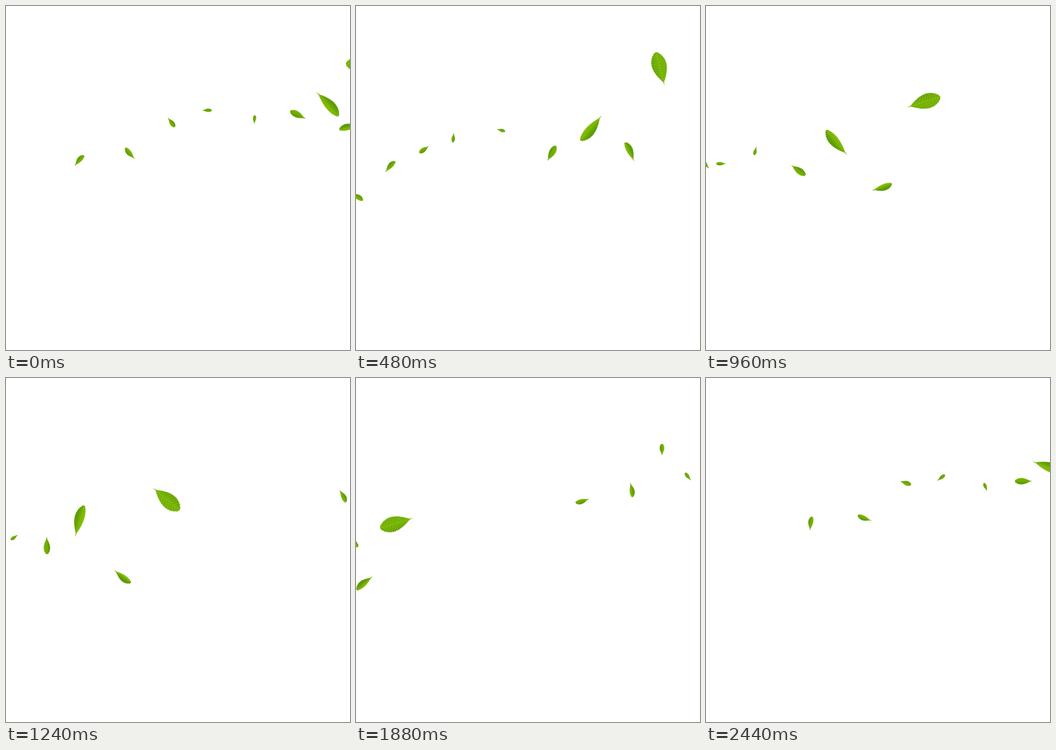
An HTML page with a canvas that plays this animation: 600 px wide and 600 px high, repeating every 2.48 s.

```html
<!DOCTYPE html>
<html lang="en">
<head>
<meta charset="utf-8">
<title>Leaves in the wind</title>
<style>
html, body { margin: 0; width: 100%; height: 100%; overflow: hidden; background: #fff; }
canvas { display: block; width: 600px; height: 600px; }
</style>
</head>
<body>
<canvas id="stage" width="600" height="600"></canvas>
<script>
const ctx = document.getElementById('stage').getContext('2d');
const STEP = 40, LOOP = 2480, CYCLE = 2600;
const leaves = [];

// cw / ccw: half widths on either side of the midrib; mid: time at x = 300
// keys: [time, y, stem direction in degrees]
function leaf(look, mid, speed, ...keys) {
  leaves.push({ ...look, mid, speed, keys, path: outline(look) });
}

function outline({ len, cw, ccw, teeth }) {
  const p = new Path2D(), body = len * 0.9, x0 = -len / 2;
  const depth = Math.min(1.1, len * 0.03);
  const edge = u => Math.pow(Math.sin(Math.PI * Math.pow(u, 0.8)), 0.85);
  p.moveTo(x0, 0);
  for (let i = 1; i <= teeth; i++) {
    const u = i / (teeth + 1), w = cw * edge(u);
    p.lineTo(x0 + u * body - 1, w + depth / 2);
    p.lineTo(x0 + u * body, Math.max(0.4, w - depth / 2));
  }
  p.lineTo(x0 + body, 0.6);
  p.lineTo(len / 2, 0);
  p.lineTo(x0 + body, -0.6);
  for (let i = teeth; i >= 1; i--) {
    const u = i / (teeth + 1), w = ccw * edge(u);
    p.lineTo(x0 + u * body, -Math.max(0.4, w - depth / 2));
    p.lineTo(x0 + u * body - 1, -w - depth / 2);
  }
  p.closePath();
  return p;
}

// Smooth curve through the keys, straight beyond both ends
function sample(keys, t, k) {
  const last = keys.length - 1;
  const rise = (a, b) => (keys[b][k] - keys[a][k]) / (keys[b][0] - keys[a][0]);
  if (t <= keys[0][0]) return keys[0][k] + rise(0, 1) * (t - keys[0][0]);
  if (t >= keys[last][0]) return keys[last][k] + rise(last - 1, last) * (t - keys[last][0]);
  let i = 0;
  while (t > keys[i + 1][0]) i++;
  const slope = j => rise(Math.max(0, j - 1), Math.min(last, j + 1));
  const h = keys[i + 1][0] - keys[i][0], s = (t - keys[i][0]) / h;
  const s2 = s * s, s3 = s2 * s;
  return (2 * s3 - 3 * s2 + 1) * keys[i][k] + (s3 - 2 * s2 + s) * h * slope(i)
    + (3 * s2 - 2 * s3) * keys[i + 1][k] + (s3 - s2) * h * slope(i + 1);
}

function line(x1, y1, x2, y2) {
  ctx.beginPath();
  ctx.moveTo(x1, y1);
  ctx.lineTo(x2, y2);
  ctx.stroke();
}

function drawLeaf(f, time) {
  const half = CYCLE / 2;
  const u = ((time - f.mid + half) % CYCLE + CYCLE) % CYCLE - half;
  const t = u + f.mid;
  ctx.save();
  ctx.translate(300 - 340 * Math.sin(f.speed * u), sample(f.keys, t, 1));
  ctx.rotate(sample(f.keys, t, 2) * Math.PI / 180);

  const g = ctx.createLinearGradient(0, -f.ccw, 0, f.cw);
  f.tones.forEach((c, i) => g.addColorStop(i / (f.tones.length - 1), c));
  ctx.fillStyle = g;
  ctx.fill(f.path);

  ctx.clip(f.path);
  ctx.lineWidth = f.len > 40 ? 0.9 : 0.6;
  if (f.veins) {
    ctx.strokeStyle = f.veins;
    for (let x = -f.len * 0.5; x < f.len * 0.35; x += f.len * 0.08) {
      line(x + 5, 0, x - 2, f.cw);
      line(x + 5, 0, x - 2, -f.ccw);
    }
  }
  ctx.strokeStyle = f.rib;
  line(-f.len * 0.45, 0, f.len * 0.4, 0);
  ctx.restore();
}

const green = { rib: 'rgba(150,200,30,.6)', tones: ['#8fc206', '#6dab02', '#579404'] };
const small = { ...green, tones: ['#7fb800', '#6aa600', '#5c9602'] };
const tiny = { ...small, rib: 'rgba(150,200,30,.4)' };

leaf({ ...tiny, len: 15, cw: 2.8, ccw: 2.8, teeth: 6 }, 357, 0.00113,
  [-160, 190, 69], [0, 198, 94], [320, 210, 153], [640, 226, 234], [1240, 278, 325]);
leaf({ ...tiny, len: 17, cw: 3, ccw: 3, teeth: 6 }, 132, 0.00113,
  [-720, 172, 53], [-160, 174, 142], [0, 182, 180], [320, 210, 240], [640, 249, 310], [960, 275, 360]);
leaf({ ...small, len: 20.5, cw: 4, ccw: 4, teeth: 7 }, -31, 0.0011,
  [-1040, 117, 35], [-720, 125, 90], [-160, 183, 198], [0, 203, 233], [320, 240, 296], [640, 258, 352]);
leaf({ ...small, len: 26, cw: 5.5, ccw: 3.2, teeth: 8 }, -221, 0.00112,
  [-1040, 168, 214], [-720, 195, 263], [-160, 244, 383], [0, 257, 411], [320, 275, 470], [640, 285, 514]);
leaf({ ...small, len: 25, cw: 5.5, ccw: 3.2, teeth: 8 }, -470, 0.00113,
  [-1360, 206, 244], [-1040, 207, 288], [-720, 214, 345], [-160, 254, 460], [0, 270, 493], [320, 312, 545]);
leaf({ ...small, len: 31, cw: 5.6, ccw: 5.6, teeth: 9 }, 587, 0.00113,
  [-160, 180, 0], [0, 190, 27], [320, 236, 88], [640, 273, 151], [1240, 292, 269], [1560, 288, 315]);
leaf({ ...green, len: 37, cw: 4, ccw: 7.5, teeth: 10, tones: ['#579404', '#66a302', '#8fc206'] }, 978, 0.0011,
  [0, 212, -12], [320, 235, 35], [640, 276, 95], [1240, 346, 217], [1560, 358, 276], [1880, 358, 319]);
leaf({ ...green, len: 58, cw: 10.5, ccw: 6.5, teeth: 14 }, 772, 0.00113,
  [-160, 156, 202], [0, 171, 228], [320, 199, 280], [640, 224, 343], [1240, 250, 466], [1560, 268, 510], [1880, 284, 560]);
leaf({ ...green, len: 61, cw: 13, ccw: 13, teeth: 14, veins: 'rgba(150,208,40,.55)',
  tones: ['#72ae08', '#74b104', '#649f04'] }, 1183, 0.00106,
  [0, 103, 5], [320, 106, 53], [640, 121, 100], [1240, 211, 220], [1560, 246, 283], [1880, 253, 343], [2440, 255, 385]);

function frame(now) {
  const time = Math.floor((now % LOOP) / STEP) * STEP;
  ctx.clearRect(0, 0, 600, 600);
  for (const f of leaves) drawLeaf(f, time);
  requestAnimationFrame(frame);
}
frame(0);
</script>
</body>
</html>
```
